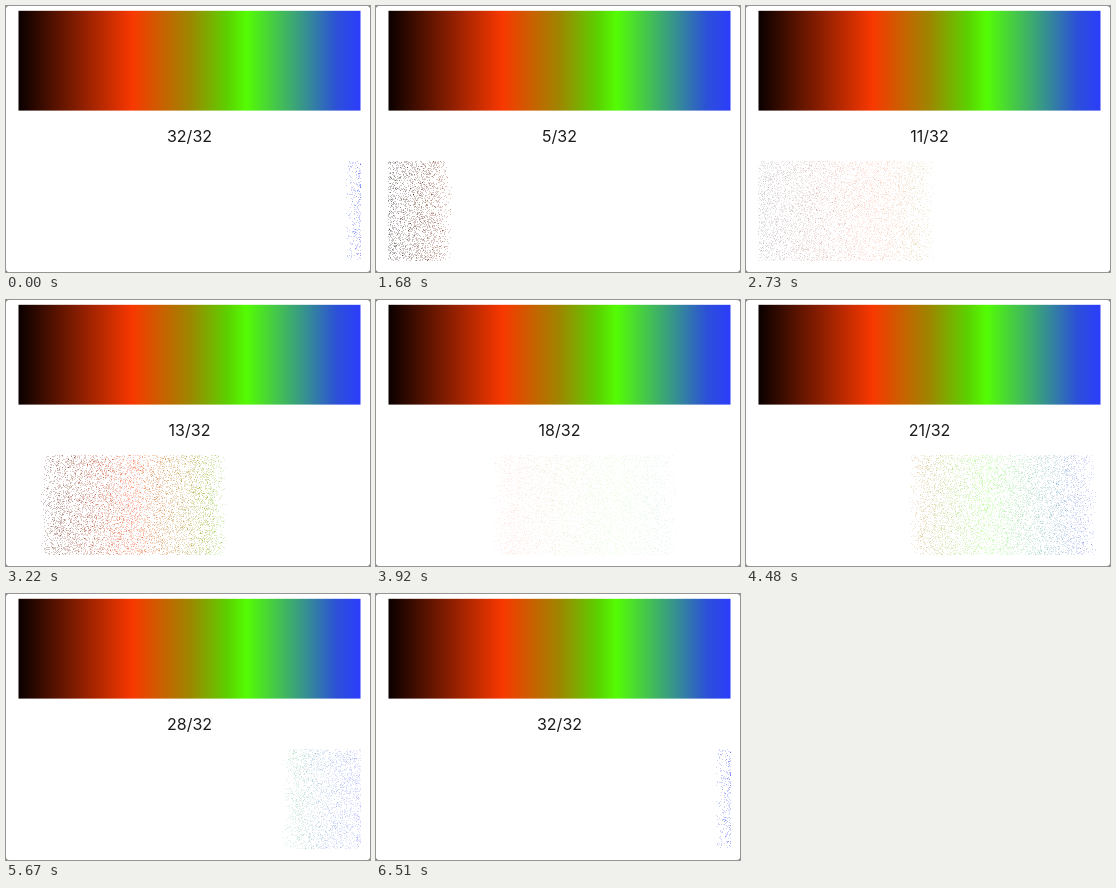
These frames come from a looping animation (364 px wide and 266 px high, 6.58 s). An HTML page with a canvas:

```html
<!DOCTYPE html>
<html lang="en">
<head>
<meta charset="utf-8">
<title>Gradient dust layers</title>
<style>
  html, body { margin: 0; width: 100%; height: 100%; overflow: hidden; background: #fff; }
  canvas { display: block; width: 364px; height: 266px; }
</style>
</head>
<body>
<canvas id="stage" width="364" height="266"></canvas>
<script>
const W = 364, H = 266;
const LOOP = 6580, TICK = 70, RESET = 770;
const LAYERS = 32, GRAINS = 4;
const BAR = { x: 12, w: 343, h: 100 };
const DUST_Y = 155;
const LABEL = { start: 960, step: 174 };
const DUST = { start: 995, step: 172, fade: 60 };
const STOPS = [
  [0, '#080000'], [1 / 3, '#f83800'], [0.5, '#9e8600'], [0.61, '#5cd000'],
  [2 / 3, '#54fc04'], [5 / 6, '#36948c'], [0.93, '#2c50d8'], [1, '#2c3cfc']
];

const ctx = document.getElementById('stage').getContext('2d');

function makeCanvas() {
  const c = document.createElement('canvas');
  c.width = BAR.w;
  c.height = BAR.h;
  return c;
}

function barGradient(g, x) {
  const grad = g.createLinearGradient(x, 0, x + BAR.w, 0);
  STOPS.forEach(([at, col]) => grad.addColorStop(at, col));
  return grad;
}

function seeded(seed) {
  return () => {
    seed = (seed + 0x6d2b79f5) | 0;
    let v = Math.imul(seed ^ (seed >>> 15), 1 | seed);
    v = (v + Math.imul(v ^ (v >>> 7), 61 | v)) ^ v;
    return ((v ^ (v >>> 14)) >>> 0) / 4294967296;
  };
}

// Every pixel holds a few grains. Each grain goes to one layer,
// where its column weighs twice as much as chance.
function makeDust() {
  const g = makeCanvas().getContext('2d');
  g.fillStyle = barGradient(g, 0);
  g.fillRect(0, 0, BAR.w, BAR.h);
  const src = g.getImageData(0, 0, BAR.w, BAR.h).data;
  const rand = seeded(2024);
  const images = Array.from({ length: LAYERS }, () => new ImageData(BAR.w, BAR.h));
  for (let y = 0; y < BAR.h; y++) {
    for (let x = 0; x < BAR.w; x++) {
      const p = (y * BAR.w + x) * 4;
      for (let k = 0; k < GRAINS; k++) {
        const layer = Math.floor(LAYERS * (rand() + 2 * x / BAR.w) / 3);
        const data = images[layer].data;
        data.set(src.subarray(p, p + 3), p);
        data[p + 3] += 255 / GRAINS;
      }
    }
  }
  return images.map(img => {
    const c = makeCanvas();
    c.getContext('2d').putImageData(img, 0, 0);
    return c;
  });
}

const barFill = barGradient(ctx, BAR.x);
const dust = makeDust();

function indexAt(t, clock) {
  const i = Math.floor((t - clock.start) / clock.step);
  return Math.max(0, Math.min(LAYERS - 1, i));
}

function drawCorners() {
  ctx.fillStyle = '#777';
  ctx.beginPath();
  ctx.rect(0, 0, W, H);
  ctx.roundRect(0, 0, W, H, 3);
  ctx.fill('evenodd');
}

function draw(t) {
  if (t < RESET) t += LOOP;
  ctx.fillStyle = '#fff';
  ctx.fillRect(0, 0, W, H);

  // Half-pixel inset softens the edges of the bar.
  ctx.fillStyle = barFill;
  ctx.fillRect(BAR.x + 0.5, 4.8, BAR.w - 1, BAR.h - 0.2);

  ctx.fillStyle = '#1c1c1c';
  ctx.font = '16px Inter, "Liberation Sans", sans-serif';
  ctx.textAlign = 'center';
  ctx.fillText(`${indexAt(t, LABEL) + 1}/${LAYERS}`, 183.5, 136);

  const i = indexAt(t, DUST);
  const began = i ? DUST.start + i * DUST.step : RESET;
  ctx.globalAlpha = 1 - 0.8 * Math.exp((began - t) / DUST.fade);
  ctx.drawImage(dust[i], BAR.x, DUST_Y);
  ctx.globalAlpha = 1;
  drawCorners();
}

const t0 = performance.now();
function frame() {
  const t = (performance.now() - t0) % LOOP;
  draw(Math.floor(t / TICK) * TICK);
  requestAnimationFrame(frame);
}
frame();
</script>
</body>
</html>
```
